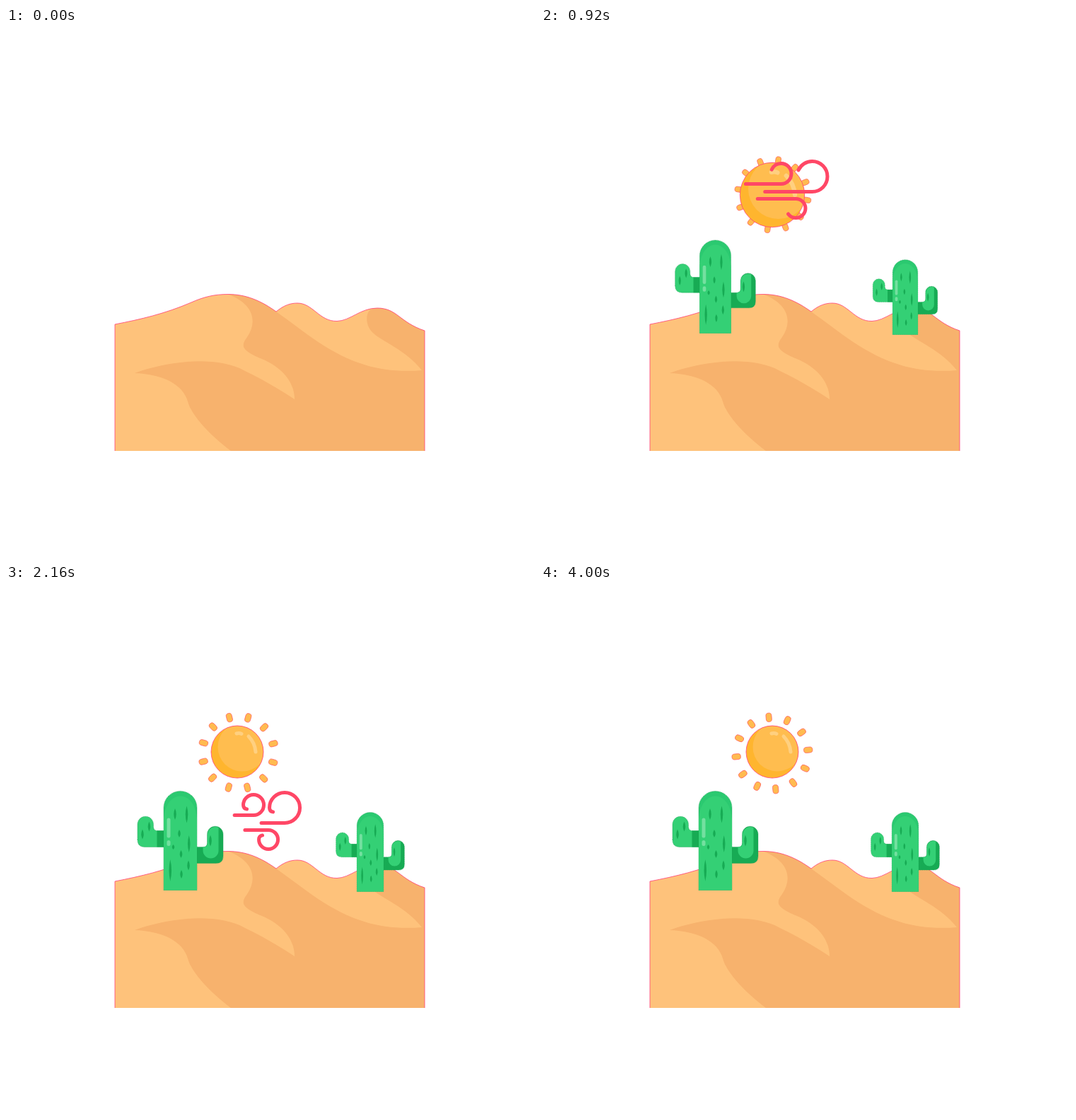
Animation, 748 px wide and 748 px high, one loop 4080 ms. Source, as an HTML page:

```html
<!DOCTYPE html>
<html lang="en">
<head>
<meta charset="utf-8">
<title>Desert</title>
<style>
  html, body { margin: 0; width: 100%; height: 100%; overflow: hidden; background: #fff; }
  svg { display: block; width: 100vw; height: 100vh; }
  .edge { fill: none; stroke: #ff3f78; stroke-width: .8; vector-effect: non-scaling-stroke; }
  .rim { stroke: #1a9a50; stroke-width: .7; stroke-dasharray: 1 1; }
  .wind { fill: none; stroke: #ff4766; stroke-width: 5; stroke-linecap: round; }
</style>
</head>
<body>
<svg viewBox="0 0 748 748">
  <defs>
    <clipPath id="disc"><circle r="37"/></clipPath>
    <!-- Cactus with the middle of its foot at the origin -->
    <g id="cactus">
      <path class="rim" fill="#34d075" d="M-60.500-71.500V-93a11.250 11.250 0 0 1 22.500 0V-90q0 6 6 6H-23V-61H-50q-10.500 0-10.500-10.500z"/>
      <path fill="#17ab54" d="M-33-84h10v23h-10z"/>
      <path class="rim" fill="#17ab54" d="M23-61H32q6 0 6-6V-79a11.250 11.250 0 0 1 22.500 0V-48q0 10-10 10H23z"/>
      <path fill="#34d075" d="M38.500-79a11 11 0 0 1 15.500-9.500V-56a11 11 0 0 1-22 0V-61q6.500 0 6.500-6z"/>
      <path class="rim" fill="#2bc970" d="M-23.500 0V-116.500a23.500 23.500 0 0 1 47 0V0z"/>
      <path fill="#34d075" d="M-23.500 0V-100C-21-144 21-144 23.500-100V0z"/>
      <g id="spines" fill="#17ab54"></g>
      <g fill="#74e0a0">
        <rect x="-19" y="-102" width="5" height="28" rx="2.500"/>
        <rect x="-19" y="-70.500" width="5" height="8" rx="2.500"/>
      </g>
    </g>
  </defs>

  <path id="dunes" fill="#fec27b" d="M154 598V419C190 412 225 404 262 388C280 380 295 376.500 314 376.500C340 376.500 361 386 382 401C393 392 402 389 412 389C434 389 443 415 468 414.500C487 414 501 396 525 396C553 396 556 416 592 428V598"/>
  <path fill="#f7b26d" d="M314 376.500C340 376.500 361 386 382 401C440 442 490 492 588 484C565 455 530 442 520 432C510 424 507 408 514 399C518 397 521 396 525 396C553 396 556 416 592 428V598H318C290 577 262 548 257 528C250 505 225 490 182 488C230 470 300 463 338 485C365 498 390 513 408 525C408 500 390 480 362 468C330 455 333 448 341 437C356 415 350 390 314 376.500"/>
  <use href="#dunes" class="edge" id="ridge"/>

  <use href="#cactus" id="left"/>
  <use href="#cactus" id="right"/>

  <g id="rays" fill="#ffbb50"></g>
  <g id="sun">
    <g clip-path="url(#disc)">
      <circle r="37" fill="#ffb52e"/>
      <circle cx="7" cy="-7" r="34.500" fill="#ffbd4f"/>
    </g>
    <g fill="none" stroke="#ffd080" stroke-width="5" stroke-linecap="round">
      <path d="M-1-26q4-1 7 .5M16-22Q25-13 26 0"/>
    </g>
    <circle class="edge" r="37"/>
  </g>
  <g id="wind"></g>
</svg>

<script>
const LOOP = 4080, STEP = 40, HALF = 450;
const $ = id => document.getElementById(id);
const put = (el, x, y, s, more = '') =>
  el.setAttribute('transform', `translate(${x} ${y}) ${more} scale(${s})`);

// The outline is a copy, so the fill of the dunes stays below the shadows.
$('ridge').replaceWith(Object.assign($('dunes').cloneNode(), { id: 'outline' }));
$('outline').setAttribute('class', 'edge');
$('outline').setAttribute('fill', 'none');

// Spines: x, y, height
$('spines').innerHTML = [
  [-7.500, -107.500, 16], [9, -107, 24], [-1.500, -80, 11], [12.200, -65.500, 24],
  [-10, -61, 7], [1, -51, 11], [11.500, -35, 14], [-14.200, -28, 31], [1.500, -22.500, 12],
  [-53.500, -79, 14], [-44, -90, 14], [42.500, -70, 16]
].map(([x, y, h]) =>
  `<path d="M${x} ${y - h / 2}q3.500 ${h / 2} 0 ${h}q-3.500 ${-h / 2} 0 ${-h}"/>`).join('');

$('rays').innerHTML = Array.from({ length: 12 }, (_, i) =>
  `<rect x="-4" y="-57.200" width="8" height="12.400" rx="3.800" stroke="#ff5a60" stroke-width=".7"
    transform="translate(-.35 1.200) rotate(${i * 30 - 5.400})"/>`).join('');

// Gusts: centre and radius of the curl, side of the line, line length, loss of line per ms, stroke length
const curls = [
  { x: 0, y: 0, r: 14.5, side: 1, line: 51, loss: .043, len: 112 },
  { x: 44, y: 4, r: 21.5, side: 1, line: 68, loss: .0625, len: 158 },
  { x: 21, y: 49, r: 13.5, side: -1, line: 55, loss: .039, len: 109 }
];
const START = 90;
$('wind').innerHTML = curls.map(({ x, y, r, side }) =>
  `<path class="wind" transform="translate(${x} ${y})" d="M${-START} ${side * r}H0
    A${r} ${r} 0 1 ${side > 0 ? 0 : 1} ${-r} 0q0 ${side * 5} 5 ${side * 6}"/>`).join('');
const strokes = [...$('wind').children];

// Each passage: first and last moment, and a known place with its time and age
const gusts = [
  { from: 880, to: 1430, at: 1200, x: 440, y: 257, age: 300 },
  { from: 1550, to: 2240, at: 1600, x: 149, y: 209, age: 0 }
];

const spring = (t, damp = 1.427) =>
  t <= 0 ? 0 : 1 - Math.exp(-damp * t / HALF) * Math.cos(Math.PI * t / HALF);

function drawWind(t) {
  const gust = gusts.find(g => t >= g.from && t < g.to);
  $('wind').style.display = gust ? '' : 'none';
  if (!gust) return;
  const dt = t - gust.at;
  put($('wind'), gust.x + dt * .359, gust.y + dt * .182, 1);
  curls.forEach((c, i) => {
    const line = c.line - c.loss * (gust.age + dt);
    strokes[i].style.strokeDasharray = `${c.len} 999`;
    strokes[i].style.strokeDashoffset = line - START;
  });
}

function draw(now) {
  const t = Math.min(Math.floor(now % LOOP / STEP) * STEP, LOOP - 2 * STEP);
  put($('left'), 246.5, 431.5, spring(t - 38));
  put($('right'), 515, 433.5, .8 * spring(t - 145));
  put($('sun'), 327, 236, spring(t - 590));
  put($('rays'), 327.3, 236.8, spring(t - 720, 2.9), `rotate(${.0538 * (t - 4000)})`);
  drawWind(t);
}

const begin = performance.now();
function tick() {
  draw(performance.now() - begin);
  requestAnimationFrame(tick);
}
tick();
</script>
</body>
</html>
```
